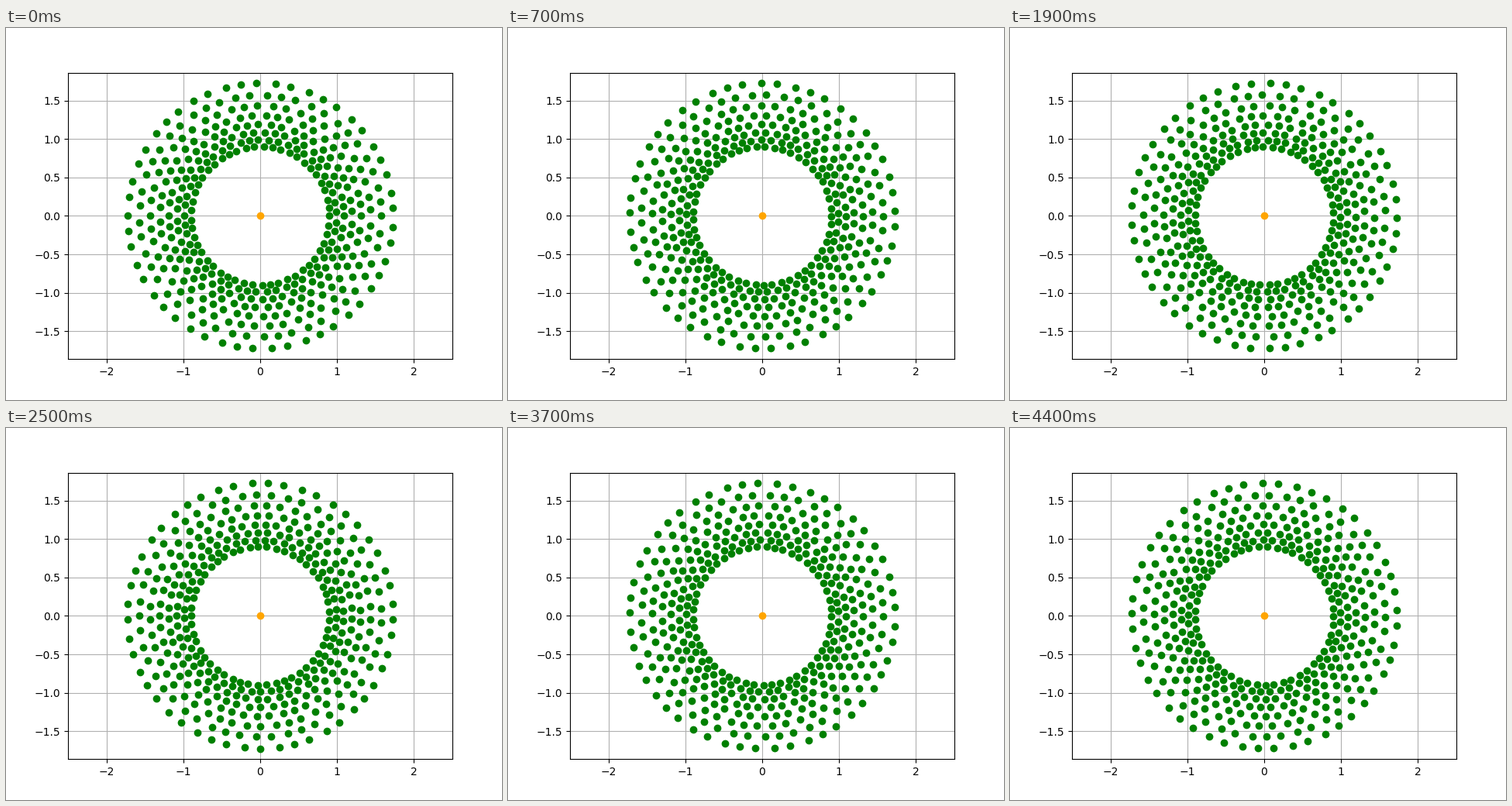
A matplotlib script that plays this animation: 640 by 480 pixels, repeating every 4500 ms.

```python
import numpy as np
import matplotlib.pyplot as plt
from matplotlib.animation import FuncAnimation

FRAMES = 45
RINGS, DOTS = 8, 49
R0, GROWTH = 0.9, 1.0975
STEP = 595 / 3      # degrees between consecutive dots on a ring
HALF = 2.5          # half width of the x range

fig, ax = plt.subplots(figsize=(6.4, 4.8), dpi=100)
box = ax.get_position()
ratio = (box.height * 4.8) / (box.width * 6.4)
ax.set_xlim(-HALF, HALF)
ax.set_ylim(-HALF * ratio, HALF * ratio)
ax.grid(True)

ring = np.arange(RINGS)[:, None]
radius = R0 * GROWTH ** ring
start = 180 * (ring % 2) + STEP * np.arange(DOTS)
spin = np.where(ring % 2, 1, -1)    # neighbouring rings turn opposite ways

dots, = ax.plot([], [], "o", color="green")
ax.plot([0], [0], "o", color="orange")


def update(i):
    angle = np.radians(start + spin * i)
    dots.set_data((radius * np.cos(angle)).ravel(),
                  (radius * np.sin(angle)).ravel())
    return dots,


anim = FuncAnimation(fig, update, frames=FRAMES, interval=100, repeat=True)
plt.show()
```
